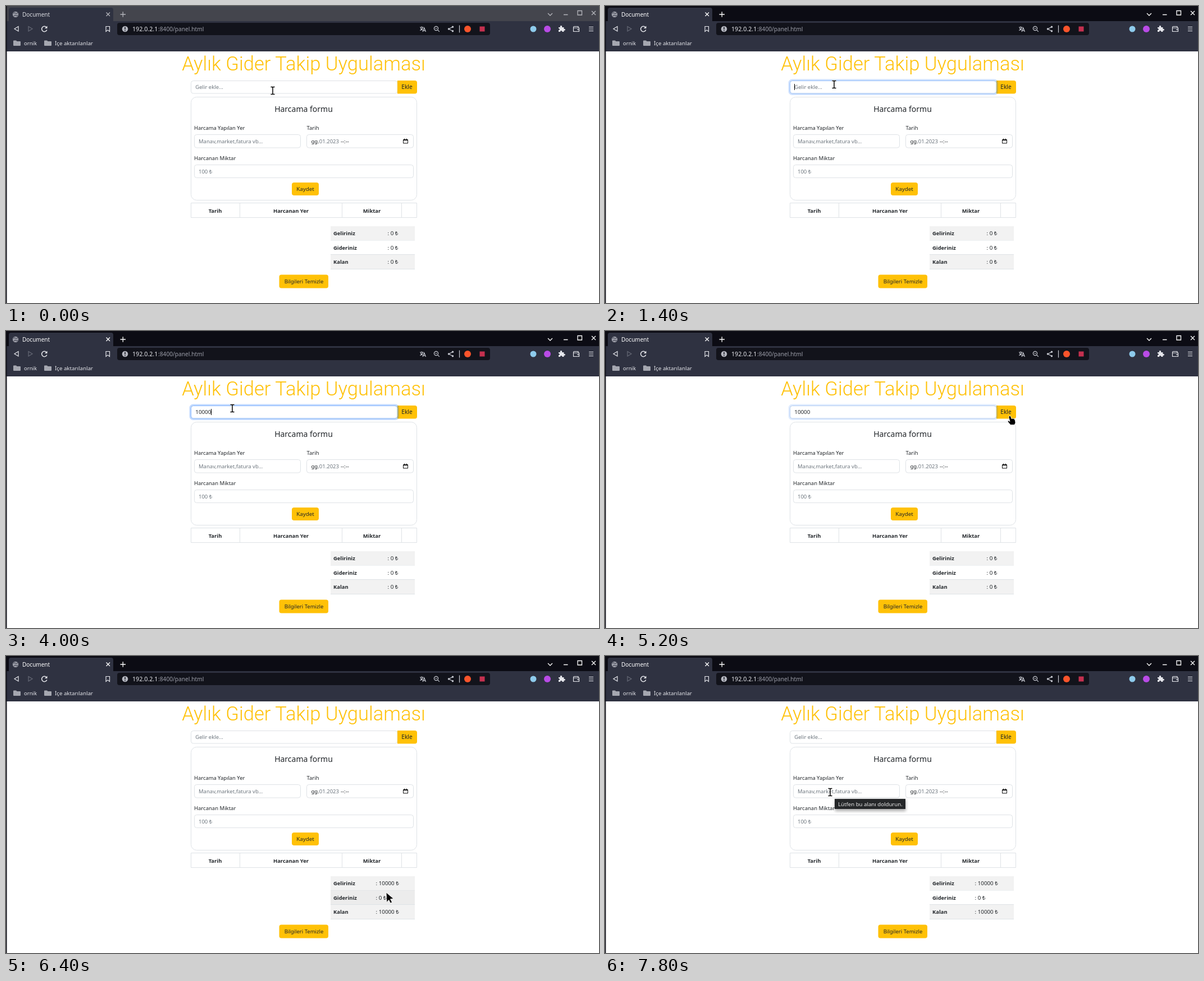
These frames come from a looping animation (1056x530 px, 8000 ms). An HTML page:

```html
<!DOCTYPE html>
<html lang="tr">
<head>
<meta charset="utf-8">
<title>Gider Takip</title>
<style>
  html, body { margin: 0; width: 100%; height: 100%; overflow: hidden; background: #fff; }
  svg { display: block; }
  text { font: 9.5px "Noto Sans", "Open Sans", sans-serif; fill: #212529; white-space: pre; }
  .mid { text-anchor: middle; }
  .title { font: 300 34.6px Roboto, "Noto Sans", sans-serif; fill: #ffc107; }
  .head { font-size: 14px; }
  .bold { font-size: 9.4px; font-weight: 700; }
  .num { font-size: 9.8px; }
  .hint { fill: #6c757d; }
  .light { fill: #e6e7ec; }
  .box { fill: #fff; stroke: #dee2e6; }
  .rule { fill: none; stroke: #dee2e6; }
  .btn { fill: #ffc107; }
  .line { fill: none; stroke: #e6e7ec; stroke-width: 1.2; }
  .win { fill: none; stroke-width: 1.3; }
  .cursor { fill: #000; stroke: #fff; stroke-width: .8; stroke-linejoin: round; }
</style>
</head>
<body>
<svg width="1056" height="530" viewBox="0 0 1056 530">
  <rect width="1056" height="530" fill="#fff"/>

  <!-- window frame -->
  <rect id="strip" width="1056" height="28"/>
  <path d="M5 28V7q0-4 4-4h178q4 0 4 4v21z" fill="#2f3241"/>
  <rect y="27" width="1056" height="54" fill="#2f3241"/>
  <rect id="edge" width="1.5" height="530" fill="#0c0c14"/>
  <circle cx="17" cy="15" r="5.2" fill="#9a9ca6"/>
  <path d="M13 13q3-2 4 0t4-1M14 18q2-3 4-1t3-1" fill="none" stroke="#2f3241"/>
  <text id="tab" x="29" y="18.6" style="font-size:10px">Document</text>
  <g id="controls" class="win">
    <path d="M178.500 11.500l6.500 6.500m0-6.500l-6.500 6.500M203.500 15h9.500m-4.750-4.750v9.500"/>
    <path d="M965 13l4 4 4-4M993 15.500h7.500M1018 8.500h7.500v7.500h-7.500zM1043 9l7 7m0-7l-7 7"/>
  </g>

  <!-- toolbar -->
  <path class="line" d="M22 36.500v8.500l-7-4.250z"/>
  <path class="line" d="M40 36.500v8.500l7-4.250z" style="stroke:#666976"/>
  <path class="line" d="M72 38a4.700 4.700 0 1 0 .8 4.500" style="stroke-width:1.5"/>
  <path d="M73.500 35.500v4.500H69z" class="light"/>
  <path class="line" d="M178 36.500h6.500v9l-3.250-2.600-3.250 2.600z"/>
  <rect x="198" y="30" width="664" height="22" rx="4" fill="#12131b"/>
  <circle cx="212" cy="41" r="5.300" fill="#b3b5be"/>
  <path d="M212 37.500v4.300m0 1.200v1.500" stroke="#12131b" stroke-width="1.500"/>
  <text class="light" x="225" y="44.500" style="font-size:10.700px">192.0.2.1</text>
  <text x="271" y="44.500" style="font-size:10.200px;fill:#9b9da8">:8400/panel.html</text>
  <g class="line" style="stroke:#c8cad2">
    <path d="M737 38h6.500m-3.250-1.500V38m2 0q-1 4-5 5.500m1-4.500q1 2.500 3.500 4M742 46l2.750-7 2.750 7m-4.500-2.200h3.500"/>
    <circle cx="766" cy="40" r="3.600"/><path d="M768.800 42.800l3 3M764.300 40h3.400"/>
    <path d="M795 37.500l-6.500 3.500 6.500 3.500"/>
    <path d="M807.500 34.500v13"/>
  </g>
  <g fill="#c8cad2"><circle cx="795.500" cy="37.300" r="1.700"/><circle cx="788.500" cy="41" r="1.700"/><circle cx="795.500" cy="44.700" r="1.700"/></g>
  <circle cx="822" cy="41" r="6" fill="#fb542b"/>
  <rect x="843.500" y="36.500" width="9" height="9" fill="#c4304f"/>
  <circle cx="939" cy="41" r="5.500" fill="#8ecbec"/>
  <circle cx="964" cy="41" r="6" fill="#b94be6"/>
  <path class="light" d="M984 38h3q-.8-3 1.500-3t1.500 3h3.500v3q2.500-.5 2.500 1.300t-2.500 1.400V46h-3q0-2-1.700-2T987 46h-3v-3q2 0 2-1.500T984 40z"/>
  <path class="line" d="M1010.500 39v-1q0-1.500 1.500-1.500h7v2.500m-8.500 0h10v6.500h-10zM1017 42.200h3.500"/>
  <path class="line" d="M1038 37.500h8M1038 41h8M1038 44.500h8"/>
  <g fill="#a5a7b0">
    <path id="folder" d="M13 62.500q0-1 1-1h4l1.500 1.500h5.500q1 0 1 1v6q0 1-1 1H14q-1 0-1-1z"/>
    <use href="#folder" x="55"/>
  </g>
  <text class="light" x="32" y="69.500">ornik</text>
  <text class="light" x="87" y="69.500" style="font-size:9.700px">İçe aktarılanlar</text>

  <!-- page -->
  <text class="title mid" x="530" y="115">Aylık Gider Takip Uygulaması</text>
  <rect class="box" x="329.500" y="133.500" width="367.500" height="22.500" rx="4"/>
  <path class="btn" d="M697 133h31q4 0 4 4v15.500q0 4-4 4h-31z"/>
  <g id="ring" fill="none">
    <rect x="327.800" y="131.800" width="370.900" height="25.900" rx="5.500" stroke="#0d6efd" stroke-opacity=".25" stroke-width="2.600"/>
    <rect x="329.500" y="133.500" width="367.500" height="22.500" rx="4" stroke="#86b7fe"/>
  </g>
  <text id="income" x="337.300" y="147.700"></text>
  <rect id="caret" y="139" width="1" height="11" fill="#000"/>
  <text class="mid" x="714" y="147.700" style="font-size:10.200px">Ekle</text>

  <rect class="box" x="329.500" y="162.500" width="402" height="184" rx="10"/>
  <text class="head mid" x="530" y="188.500">Harcama formu</text>
  <text x="335" y="220.600" style="font-size:9.400px">Harcama Yapılan Yer</text>
  <text x="535.500" y="220.600">Tarih</text>
  <text x="335" y="274.500">Harcanan Miktar</text>
  <rect class="box" x="335.500" y="229.500" width="189" height="23.500" rx="4"/>
  <rect class="box" x="535.500" y="229.500" width="190" height="23.500" rx="4"/>
  <rect class="box" x="335.500" y="283.500" width="390" height="23" rx="4"/>
  <text class="hint" x="343" y="244.700">Manav,market,fatura vb...</text>
  <text x="543.500" y="244.700">gg.</text>
  <text class="hint" x="557.800" y="244.700">01.2023</text>
  <text x="596" y="244.700">--:--</text>
  <path d="M707.500 238.500h8v6.500h-8zM707.500 239.500h8M709.500 236.500v2m4-2v2" fill="none" stroke="#111"/>
  <text class="hint" x="343" y="298.600">100 ₺</text>
  <rect class="btn" x="509" y="315" width="48" height="23" rx="4"/>
  <text class="mid" x="533" y="329.600" style="font-size:9.800px">Kaydet</text>

  <path class="rule" d="M329.500 351.500h402v26h-402zM416.500 351.500v26M598.500 351.500v26M704.500 351.500v26"/>
  <text class="bold mid" x="372.500" y="368.500">Tarih</text>
  <text class="bold mid" x="507.500" y="368.500">Harcanan Yer</text>
  <text class="bold mid" x="651.500" y="368.500">Miktar</text>

  <g id="totals"></g>
  <rect class="btn" x="486.500" y="479.500" width="87.500" height="24" rx="4"/>
  <text class="mid" x="530.500" y="495">Bilgileri Temizle</text>

  <g id="tip">
    <rect x="409" y="256" width="127" height="21" rx="3" fill="#000" style="filter:blur(2.500px);opacity:.3"/>
    <rect x="409" y="255" width="126" height="18" fill="#252729"/>
    <text x="415" y="267.500" style="font-size:9.650px;fill:#e8e8e8">Lütfen bu alanı doldurun.</text>
  </g>

  <g id="beam">
    <path id="stem" d="M-3.500-6.500H-1L0-6 1-6.500H3.500M0-6V6M-3.500 6.500H-1L0 6 1 6.500H3.500" fill="none" stroke="#fff" stroke-width="2.600"/>
    <path d="M-3.500-6.500H-1L0-6 1-6.500H3.500M0-6V6M-3.500 6.500H-1L0 6 1 6.500H3.500" fill="none" stroke="#000" stroke-width="1.500"/>
  </g>
  <path id="hand" class="cursor" d="M-1.500 0Q0-1.500 1.300 0L3 4.500 5.500 4 8 5l1.500 3 .5 4-2 3.500H1L-3.500 10Q-4.500 8-2.500 8L0 9.500-2 2z"/>
  <path id="arrow" class="cursor" d="M0-1L13 10 7.500 10.800 10.500 16.500 7.500 18 4.800 12.300 1 16.500z"/>
</svg>
<script>
const LOOP = 8000, STEP = 100;
const $ = id => document.getElementById(id);
const show = (id, on) => { $(id).style.display = on ? '' : 'none'; };
const within = (a, b, t) => t >= a && t < b;

// summary table
const rows = ['Geliriniz', 'Gideriniz', 'Kalan'].map((label, i) => {
  const y = 393 + i * 25.5;
  $('totals').insertAdjacentHTML('beforeend',
    `<g><rect x="578" y="${y}" width="150" height="25.5"/>
     <path class="rule" d="M578 ${Math.floor(y + 25) + .5}h150"/>
     <text class="bold" x="583" y="${y + 16}">${label}</text>
     <text class="num" y="${y + 16}"></text></g>`);
  const group = $('totals').lastElementChild;
  return { y, fill: i % 2 ? '#fff' : '#f2f2f2', back: group.children[0], value: group.children[3] };
});

// pointer moves: first and last step, then destination
const moves = [
  [500, 700, 408, 140], [4000, 4000, 403, 138], [4100, 4200, 622, 155],
  [4400, 4600, 721, 152], [6000, 6400, 677, 423],
  [6800, 7000, 409, 246], [7200, 7200, 401, 243],
];
function pointer(t) {
  let x = 475, y = 151;
  for (const [from, to, tx, ty] of moves) {
    if (t < from) break;
    const p = Math.min(1, (t - from + STEP) / (to - from + STEP));
    const k = 1 - (1 - p) ** 1.5;
    x += (tx - x) * k;
    y += (ty - y) * k;
  }
  return { x, y };
}

const fields = [[329, 133, 697, 157], [335, 229, 525, 253], [535, 229, 726, 253], [335, 283, 726, 307]];
const hit = ({ x, y }, [l, t, r, b]) => x >= l && x < r && y >= t && y < b;
function shape(p) {
  if (hit(p, [697, 133, 732, 157])) return 'hand';
  return fields.some(f => hit(p, f)) ? 'beam' : 'arrow';
}

function typed(t) {
  if (!within(2500, 5400, t)) return '';
  return t < 3000 ? '1' : t < 3400 ? '1000' : '10000';
}

function ringLevel(t) {
  if (!within(1400, 5400, t)) return 0;
  return t < 1500 ? .8 : t < 5200 ? 1 : .5;
}

function draw(now) {
  const t = Math.floor(now % LOOP / STEP) * STEP;
  const active = t >= 1400, saved = t >= 5400;

  $('strip').setAttribute('fill', active ? '#0c0c14' : '#44454d');
  $('controls').style.stroke = active ? '#fff' : '#b4b5bb';
  $('tab').style.fill = active ? '#fff' : '#dcdde2';
  $('tab').style.fontWeight = active ? 500 : 400;

  const text = typed(t);
  $('income').textContent = text || 'Gelir ekle...';
  $('income').setAttribute('class', text ? 'num' : 'hint');
  $('ring').style.opacity = ringLevel(t);
  show('caret', within(1300, 1900, t) || within(2500, 4100, t) || within(4500, 5200, t));
  $('caret').setAttribute('x', text ? 337 + Math.round(text.length * 5.65) : 337);

  const p = pointer(t), kind = shape(p);
  for (const id of ['beam', 'hand', 'arrow']) show(id, id === kind);
  $(kind).setAttribute('transform', `translate(${p.x} ${p.y})`);

  rows.forEach((row, i) => {
    const over = hit(p, [578, row.y, 728, row.y + 25.5]);
    row.back.setAttribute('fill', over ? '#ececec' : row.fill);
    row.value.textContent = `: ${saved && i !== 1 ? 10000 : 0} ₺`;
    row.value.setAttribute('x', saved ? 658.5 : 679.5);
  });
  show('tip', t >= 7800);
}

function tick() {
  draw(performance.now());
  requestAnimationFrame(tick);
}
tick();
</script>
</body>
</html>
```
